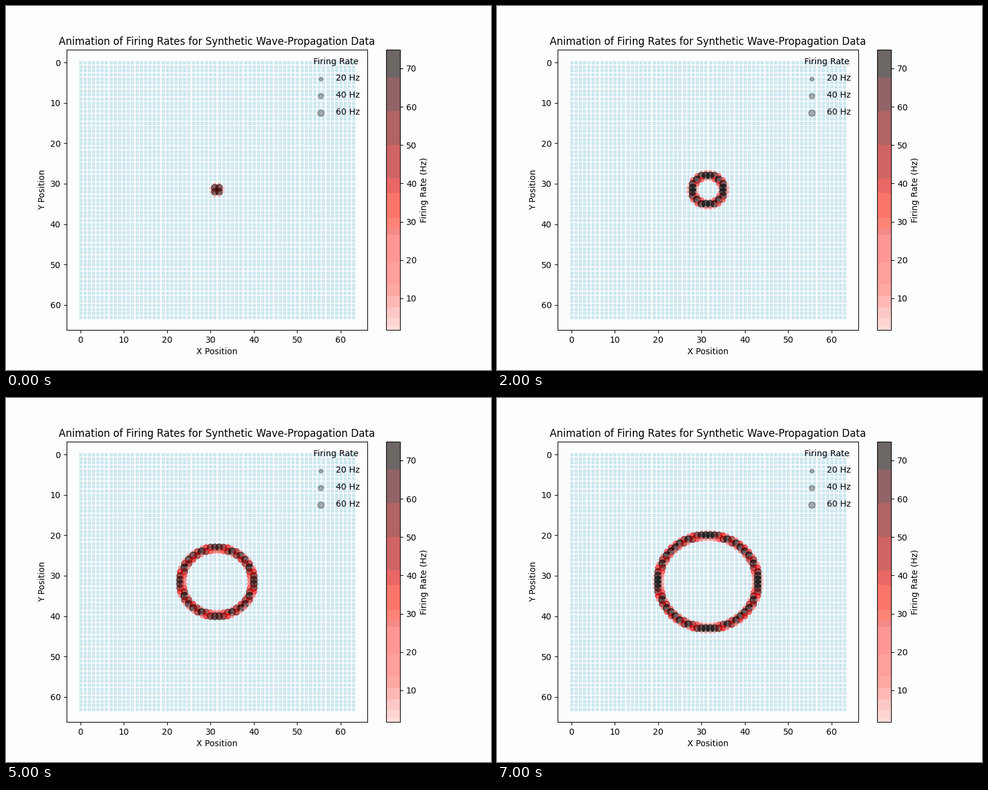
Write a matplotlib script that moves like this. It is 800x600 px and loops after 8000 ms.

```python
import numpy as np
import matplotlib.pyplot as plt
from matplotlib.animation import FuncAnimation
from matplotlib.cm import ScalarMappable
from matplotlib.colors import LinearSegmentedColormap, ListedColormap, Normalize

N = 64
STEPS = 8
SPEED = np.pi / 2
START = 0.45
WIDTH = 0.5
RATE_MIN, RATE_MAX = 1.75, 74.9
SHOWN_ABOVE = 5
PAPER = "#fcfdfe"

# Colour bar steps: lower edge in Hz and colour
BANDS = [
    (1.7, "#ffdcd8"), (2.8, "#fdd4d1"), (4.7, "#fcc8c5"), (7.6, "#fdb8b4"),
    (10.5, "#fea8a3"), (13.5, "#ffa09c"), (19.3, "#ff9894"), (26.6, "#f48a88"),
    (28.1, "#fe8478"), (31.0, "#fa7668"), (37.5, "#e86866"), (41.3, "#d06464"),
    (50.1, "#b06464"), (59.0, "#906466"), (67.7, "#6c6664"),
]


def band_cmap():
    edges = [low for low, _ in BANDS]
    levels = np.linspace(RATE_MIN, RATE_MAX, 512)
    picks = np.searchsorted(edges, levels, side="right") - 1
    return ListedColormap([BANDS[i][1] for i in picks])


norm = Normalize(RATE_MIN, RATE_MAX)
heat = LinearSegmentedColormap.from_list("heat", ["#ffc8c4", "red", "black"])

fig, ax = plt.subplots(figsize=(8, 6), dpi=100, facecolor=PAPER)
ax.set_facecolor(PAPER)

rows, cols = np.mgrid[0:N, 0:N]
xs, ys = cols.ravel(), rows.ravel()
mid = (N - 1) / 2
dist = np.hypot(xs - mid, ys - mid)

ax.scatter(xs, ys, s=5, c="lightblue", marker="s", alpha=0.5)
dots = ax.scatter([], [], s=[])

pad = 0.05 * (N - 1)
ax.set_xlim(-pad, N - 1 + pad)
ax.set_ylim(N - 1 + pad, -pad)
ax.set_xlabel("X Position")
ax.set_ylabel("Y Position")
ax.set_title("Animation of Firing Rates for Synthetic Wave-Propagation Data")

for rate in (20, 40, 60):
    ax.scatter([], [], c="k", alpha=0.3, s=rate, label=f"{rate} Hz")
ax.legend(scatterpoints=1, frameon=False, labelspacing=1,
          title="Firing Rate", loc="upper right")

fig.colorbar(ScalarMappable(norm, band_cmap()), ax=ax, label="Firing Rate (Hz)")


def update(step):
    radius = START + SPEED * step
    rates = RATE_MAX * np.exp(-((dist - radius) / WIDTH) ** 2 / 2)
    on = rates > SHOWN_ABOVE
    colors = heat(norm(rates[on]))
    colors[:, 3] = 0.6
    dots.set_offsets(np.column_stack([xs[on], ys[on]]))
    dots.set_sizes(rates[on])
    dots.set_facecolor(colors)
    dots.set_edgecolor(colors)
    return [dots]


anim = FuncAnimation(fig, update, frames=STEPS, interval=1000, repeat=True)
plt.show()
```
